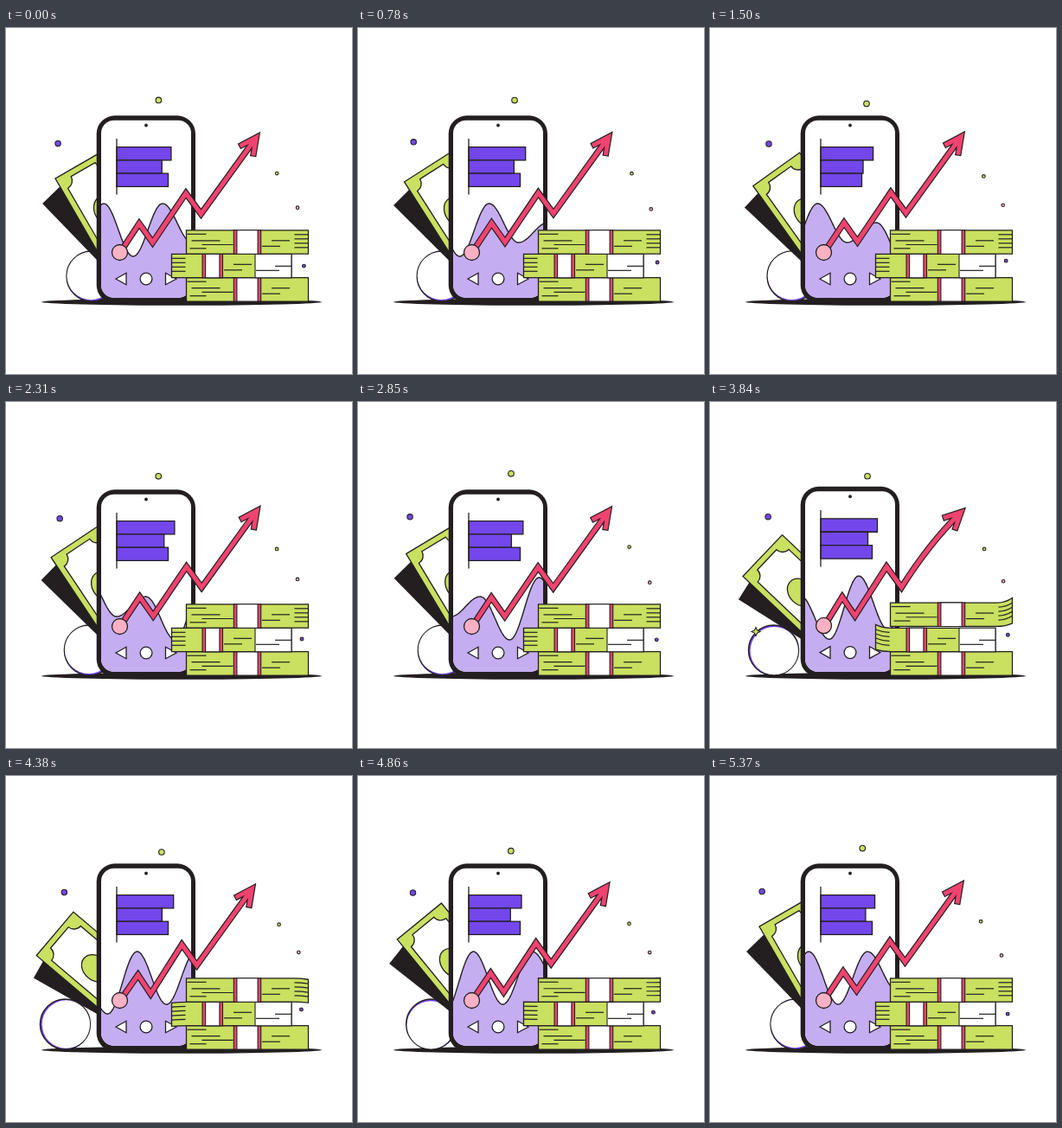
Recreate the animation shown at these times as an HTML page with a canvas. Size 400 px wide and 400 px high, loop 5400 ms.

```html
<!DOCTYPE html>
<html lang="en">
<head>
<meta charset="utf-8">
<title>Growing savings</title>
<style>
html, body { margin: 0; width: 100%; height: 100%; overflow: hidden; background: #fff; }
canvas { display: block; }
</style>
</head>
<body>
<canvas id="stage" width="400" height="400"></canvas>
<script>
const ctx = document.getElementById('stage').getContext('2d');
const LOOP = 5400, STEP = 30, TAU = Math.PI * 2, RAD = Math.PI / 180;
const INK = '#231f20', GREEN = '#c9e060', PURPLE = '#7347eb', LILAC = '#c5adf2',
      PINK = '#f0436f', ROSE = '#fab1c3', WHITE = '#fff';

const ease = k => (1 - Math.cos(Math.PI * k)) / 2;
const ramp = (t, from, to) => ease(Math.min(1, Math.max(0, (t - from) / (to - from))));
const pulse = (t, from, peak, to) => ramp(t, from, peak) - ramp(t, peak, to);

// The whole scene follows a few gestures
function gestures(t) {
  return {
    t,
    sway: pulse(t, 0, 1650, 3300),
    hop: pulse(t, 2900, 3285, 3690),
    reach: pulse(t, 2900, 3300, 3840),
    recoil: pulse(t, 3600, 3840, 4380),
    slide: ramp(t, 3030, 4150) - ramp(t, 4300, 5370)
  };
}

function paint(path, fill, width = 1.3) {
  if (fill) { ctx.fillStyle = fill; ctx.fill(path); }
  if (width) { ctx.strokeStyle = INK; ctx.lineWidth = width; ctx.stroke(path); }
}
function shape(d, fill, width) { paint(new Path2D(d), fill, width); }
function rect(x, y, w, h, fill, width, r = 0) {
  const p = new Path2D();
  p.roundRect(x, y, w, h, r);
  paint(p, fill, width);
}
function oval(x, y, rx, ry, fill, width) {
  const p = new Path2D();
  p.ellipse(x, y, rx, ry, 0, 0, TAU);
  paint(p, fill, width);
}
const dot = (x, y, r, fill, width) => oval(x, y, r, r, fill, width);
function group(draw) { ctx.save(); draw(); ctx.restore(); }

// Banknotes swing around a point behind the phone
function note(x, y, tilt, swing, draw) {
  group(() => {
    ctx.translate(142.4, 253.4);
    ctx.rotate(-swing * RAD);
    ctx.translate(x - 142.4, y - 253.4);
    ctx.rotate(-tilt * RAD);
    draw();
  });
}
function notes({ sway, slide }) {
  note(43, 203, 44, 2.6 * sway + 16.7 * slide, () => rect(0, 0, 55, 135, INK));
  note(57, 174, 30, 5.6 * sway + 20 * slide, () => {
    rect(0, 0, 66, 120, GREEN);
    shape('M17 7H49A10 10 0 0 0 59 17V103A10 10 0 0 0 49 113H17A10 10 0 0 0 7 103V17A10 10 0 0 0 17 7Z', WHITE);
    oval(33, 62, 14, 18, GREEN);
  });
}

function ball({ sway, hop, slide }) {
  const x = 99 - 4 * sway - 31 * slide, y = 287 - 13 * hop;
  const turn = (30 + 15 * sway - 210 * slide) * RAD;
  dot(x, y, 29, PURPLE, 1.4);
  dot(x - Math.cos(turn), y - Math.sin(turn), 27.7, WHITE, 0);
}

// Crests and troughs of the scrolling wave, 34 px apart
const WAVE = [203, 248, 225, 275, 203, 264];
function wave(t) {
  const p = new Path2D();
  p.moveTo(104, 320);
  for (let x = 104; x <= 220; x++) {
    const u = ((x - 181 + 204 * t / LOOP) / 34 + 12) % 6, i = Math.floor(u);
    p.lineTo(x, WAVE[i] + (WAVE[(i + 1) % 6] - WAVE[i]) * ease(u - i));
  }
  p.lineTo(220, 320);
  paint(p, LILAC, 1.4);
}

function inPhone({ hop, recoil }, draw) {
  group(() => {
    ctx.translate(162, 318 - 11 * hop);
    ctx.scale(1 - .05 * hop, 1 + .016 * recoil);
    ctx.translate(-162, -318);
    draw();
  });
}
function phone(t) {
  const beat = (mid, amp, phase) => mid + amp * Math.cos(TAU * (t / 1800 - phase));
  const ends = [beat(191.7, 3.2, .29), beat(179.6, 3.4, .22), 187.5 - 12 * pulse(t, 900, 1500, 2200)];
  rect(104.7, 101.3, 114.3, 217, INK, 0, 21);
  group(() => {
    const screen = new Path2D();
    screen.roundRect(110, 106.7, 104, 205.3, 15);
    paint(screen, WHITE, 0);
    ctx.clip(screen);
    wave(t);
  });
  dot(162, 112.5, 1.9, INK, 0);
  ends.forEach((end, i) => rect(128, 137.7 + 15.2 * i, end - 128, 15.2, PURPLE));
  shape('M128 128V192.5');
  shape('M127 290L139 283.3V296.7Z', WHITE);
  dot(162, 290, 6.9, WHITE);
  shape('M197 290L184.5 283.3V296.7Z', WHITE);
}

// Joints and tip of the arrow: place at rest, then shift at full reach
const JOINTS = [[154, 226, -4, -13], [169.5, 248, -2.5, -15], [208, 191, -14.5, -17],
  [225.5, 215, -11.5, -21], [294, 120, -10, -71]];
function arrow({ sway, hop, reach, recoil, slide }) {
  const points = JOINTS.map(([x, y, dx, dy]) => [
    x + sway + dx * reach - 5 * slide * Math.min(1, (x - 132) / 80),
    y - sway + dy * reach + 4 * slide - 4 * recoil
  ]);
  const [jx, jy] = points[3], [tx, ty] = points.pop();
  const tipX = tx + 6 * recoil, tipY = ty + 2.5 * recoil;
  const chord = Math.atan2(tipY - jy, tipX - jx), bend = 7 * recoil;
  const cx = (jx + tipX) / 2 + bend * Math.sin(chord), cy = (jy + tipY) / 2 - bend * Math.cos(chord);
  const aim = Math.atan2(tipY - cy, tipX - cx);
  const hx = tipX - 8 * Math.cos(aim), hy = tipY - 8 * Math.sin(aim);
  const stroke = (color, width, arm) => {
    const tail = a => [hx - arm * Math.cos(aim + a), hy - arm * Math.sin(aim + a)];
    ctx.strokeStyle = color;
    ctx.lineWidth = width;
    ctx.beginPath();
    ctx.moveTo(132, 259.5 - 11 * hop);
    points.forEach(p => ctx.lineTo(...p));
    ctx.quadraticCurveTo(cx, cy, hx, hy);
    ctx.moveTo(...tail(.46));
    ctx.lineTo(hx, hy);
    ctx.lineTo(...tail(-.46));
    ctx.stroke();
  };
  stroke(INK, 7.4, 22.5);
  stroke(PINK, 5, 21.3);
}

const BUNDLE = 27.4;
function band(x, w, y) {
  rect(x, y, w, BUNDLE, PINK, 1.1);
  rect(x + 3.6, y, w - 7.2, BUNDLE, WHITE, 1.1);
}
function dashes(x, y, list) {
  list.forEach(([from, to, dy]) => shape(`M${x + from} ${y + dy}H${x + to}`, null, 1.2));
}
const LONG = [[1, 23, 4.5], [6, 39, 12], [18, 54, 16.7], [4, 23, 21]];
const SHORT = [[12, 33, 12], [1, 22, 18.5]];

// A bundle whose loose end, at x = end, is flicked up
function bundle(fixed, end, y, flap) {
  const side = Math.sign(end - fixed), knee = end - 18 * side, mid = end - 8 * side;
  const edge = (dy, lift) => `${mid} ${y + dy} ${end} ${y + dy - flap * lift}`;
  shape(`M${fixed} ${y}H${knee}Q${edge(0, .7)}V${y + BUNDLE - flap * .45}`
    + `Q${mid} ${y + BUNDLE} ${knee} ${y + BUNDLE}H${fixed}Z`, GREEN);
  if (flap === null) return;
  for (let dy = 5; dy < 25; dy += 5)
    shape(`M${end - 16 * side} ${y + dy}Q${edge(dy, .6)}`, null, 1.2);
}
function stacks(t) {
  const age = t - 3840;
  const flap = age < -90 ? 0 : 8 * Math.exp(-Math.max(age, 0) / 400) * Math.cos(TAU * age / 360);
  const top = 233.8 - Math.max(0, flap) * .22;

  bundle(208.5, 349.5, 288.7, null);
  band(263.3, 31.4, 288.7);
  dashes(208.5, 288.7, LONG);
  dashes(295, 288.7, SHORT);

  bundle(330, 191.5, 261.3, flap * .7);
  rect(288, 261.3, 42, BUNDLE, WHITE, 1.1);
  band(227, 23.5, 261.3);
  dashes(251, 261.3, SHORT);
  dashes(288, 261.3, [[23, 42, 14], [1, 28, 19]]);

  bundle(208.5, 349.5, top, flap);
  band(263.3, 31.4, top);
  dashes(208.5, top, LONG);
  dashes(295, top, SHORT);
}

function floaters(t) {
  const float = (x, y, rx, ry, phase, spin, r, fill) => {
    const turn = TAU * (t / 2700 - phase);
    dot(x + rx * Math.cos(turn), y + ry * Math.cos(turn - spin * TAU * .22), r, fill, 1.1);
  };
  float(64, 133.4, 4, 1.6, .53, 1, 3.2, PURPLE);
  float(179, 85.2, 3, 2.8, .42, 1, 3.3, GREEN);
  float(315, 169.5, 2.1, 2.2, .42, 1, 1.8, GREEN);
  float(338, 206.7, 1.1, 3.2, .42, -1, 1.8, ROSE);
  float(343.7, 272, 2.7, 3.1, .21, -1, 1.9, PURPLE);
}

// Short-lived sparks around the hop and the landing
function spark(t, peak, x, y, draw) {
  const size = pulse(t, peak - 190, peak, peak + 190);
  if (!size) return;
  group(() => {
    ctx.translate(x, y);
    ctx.scale(size, size);
    draw();
  });
}
function sparks(t) {
  spark(t, 3270, 204.5, 119.5, () => {
    ctx.rotate(25 * RAD);
    rect(-2, -4.3, 4, 8.6, ROSE, 1.1, 2);
  });
  spark(t, 3270, 230, 102.5, () => dot(0, 0, 2, GREEN, 1));
  spark(t, 3840, 53, 265.5, () => shape('M0 -5L1.6 -1.6L5 0L1.6 1.6L0 5L-1.6 1.6L-5 0L-1.6 -1.6Z', GREEN, 1.1));
}

function draw(t) {
  const pose = gestures(t);
  ctx.fillStyle = WHITE;
  ctx.fillRect(0, 0, 400, 400);
  oval(203, 316.8, 162, 3.9, INK, 0);
  ball(pose);
  notes(pose);
  inPhone(pose, () => phone(t));
  arrow(pose);
  inPhone(pose, () => dot(131.5, 259.5, 9, ROSE));
  stacks(t);
  floaters(t);
  sparks(t);
}

const begin = performance.now();
function frame() {
  const t = (performance.now() - begin) % LOOP;
  draw(Math.floor(t / STEP) * STEP);
  requestAnimationFrame(frame);
}
frame();
</script>
</body>
</html>
```
